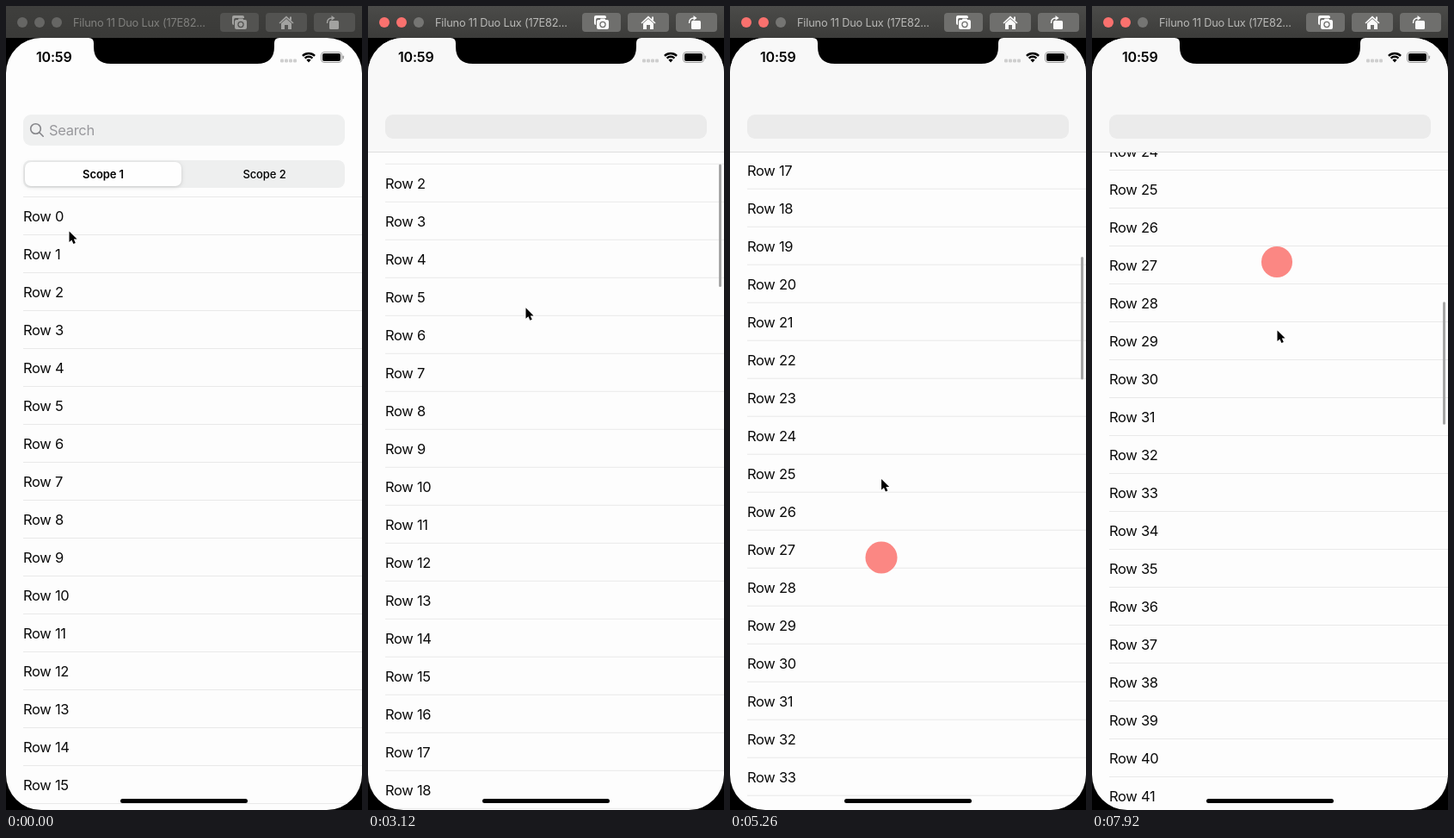
An HTML page with a canvas that plays this animation: 414x933 px, repeating every 8 s.

```html
<!DOCTYPE html>
<html lang="en">
<head>
<meta charset="utf-8">
<title>Search bar collapsing on scroll</title>
<style>
  html, body { margin: 0; width: 414px; height: 933px; overflow: hidden; background: #000; }
  canvas { display: block; }
</style>
</head>
<body>
<canvas id="stage" width="414" height="933"></canvas>
<script>
const ctx = document.getElementById('stage').getContext('2d');
const LOOP = 8000, ROW = 44, LIST_TOP = 221;

const linear = u => u;
const smooth = u => u * u * (3 - 2 * u);
const easeOut = u => 1 - (1 - u) ** 1.6;
const clamp = (v, lo, hi) => Math.min(hi, Math.max(lo, v));

// Keys: [time, values, easing towards this key]
const pointerKeys = [
  [0, [73, 261]], [430, [73, 261]], [1010, [179, 489], smooth], [1600, [179, 489]],
  [2160, [183, 445], smooth], [2240, [184, 425]], [3120, [183, 350]],
  [3610, [182, 285], easeOut], [3810, [182, 285]], [4380, [178, 110], smooth],
  [4620, [178, 110]], [5100, [176, 640], smooth], [5170, [176, 640]],
  [5480, [174, 200], smooth], [5940, [174, 206]], [6000, [174, 210]],
  [6900, [178, 594]], [7010, [179, 680], easeOut], [7560, [208, 55], smooth],
  [7820, [215, 297]], [7920, [215, 376]], [LOOP, [215, 376]]
];
const scrollKeys = [
  [0, [0]], [2239, [0]], [2240, [49]], [3120, [126]], [3610, [195], easeOut],
  [3810, [195]], [4380, [372], smooth], [4540, [385]], [4620, [428]],
  [5150, [620], easeOut], [5450, [1110]], [5960, [1896], easeOut], [6060, [1896]],
  [6900, [1543]], [7000, [1470]], [7820, [1195], easeOut], [7920, [1131]], [LOOP, [1131]]
];
const presses = [[1370, 179, 489], [3840, 182, 285], [5150, 176, 640], [5940, 174, 206], [7820, 215, 297]];

function sample(keys, t) {
  const i = Math.max(1, keys.findIndex(k => k[0] > t));
  const [t0, from] = keys[i - 1], [t1, to, ease = linear] = keys[i];
  const u = ease((t - t0) / (t1 - t0));
  return from.map((v, j) => v + (to[j] - v) * u);
}

function box(x, y, w, h, r, color) {
  ctx.fillStyle = color;
  ctx.beginPath();
  ctx.roundRect(x, y, w, h, r);
  ctx.fill();
}

function disc(x, y, r, color) {
  ctx.fillStyle = color;
  ctx.beginPath();
  ctx.arc(x, y, r, 0, 7);
  ctx.fill();
}

function shape(d, color) {
  ctx.fillStyle = color;
  ctx.fill(new Path2D(d));
}

function stroke(d, color, width) {
  ctx.strokeStyle = color;
  ctx.lineWidth = width;
  ctx.stroke(new Path2D(d));
}

function text(str, x, y, font, color, spacing = 0, align = 'left') {
  ctx.font = font + ' Inter, sans-serif';
  ctx.letterSpacing = spacing + 'px';
  ctx.textAlign = align;
  ctx.fillStyle = color;
  ctx.fillText(str, x, y);
}

function drawToolbar(active) {
  const bar = ctx.createLinearGradient(0, 0, 0, 37);
  bar.addColorStop(0, active ? '#4b4b49' : '#3f3f3d');
  bar.addColorStop(1, active ? '#3c3c3a' : '#3a3a38');
  ctx.fillStyle = bar;
  ctx.fillRect(0, 0, 414, 37);

  const light = active ? '#f9716e' : '#666664';
  disc(19, 19, 6, light);
  disc(39, 19, 6, light);
  disc(59, 19, 6, active ? '#757573' : '#666664');
  text('Filuno 11 Duo Lux (17E82...', 78, 24, '12.8px', active ? '#b9b9b7' : '#80807e', -0.2);

  const button = active ? '#6f6f6d' : '#535351';
  const icon = active ? '#fafafa' : '#a2a2a0';
  for (const [x, w] of [[249, 45], [302, 48], [358, 48]]) box(x, 8, w, 22, 4, button);

  box(263, 11, 14, 11, 2, icon);
  box(265, 14, 16, 14, 2, button);
  box(266, 16, 14, 11, 2, icon);
  box(270, 14.5, 6, 4, 1, icon);
  disc(273, 21.5, 3.7, button);
  disc(273, 21.5, 2.4, icon);

  shape('M317.5 19.5L326 11.5L334.5 19.5L333.5 20.5L326 14L318.5 20.5Z', icon);
  shape('M320 20L326 15L332 20V27H328V22H324V27H320Z', icon);
  ctx.fillStyle = icon;
  ctx.fillRect(330, 12.5, 2, 4);

  box(376, 17, 11, 10, 1.5, icon);
  stroke('M373.5 20Q373.5 14 379 14', icon, 1.4);
  shape('M378.5 11L382.5 14L378.5 17Z', icon);
}

function drawRows(scroll, top) {
  ctx.save();
  ctx.beginPath();
  ctx.rect(0, top, 414, 933 - top);
  ctx.clip();
  const first = Math.max(0, Math.floor((scroll + top - LIST_TOP) / ROW));
  for (let n = first; n < first + 19; n++) {
    const y = LIST_TOP + n * ROW - scroll;
    ctx.fillStyle = '#e9e9e9';
    ctx.fillRect(20, y, 394, 1);
    text('Row ' + n, 20, y + 28.8, '16.5px', '#0b0b0b', -0.3);
  }
  ctx.restore();
}

function drawHeader(scroll, bottom) {
  const height = clamp(bottom - 141, 28, 36);
  const middle = 126 + height / 2;
  if (scroll > 0) {
    ctx.fillStyle = '#f8f8f8';
    ctx.fillRect(0, 37, 414, bottom - 37);
    ctx.fillStyle = '#dedede';
    ctx.fillRect(0, bottom, 414, 1);
  }
  box(20, 126, 374, height, 9, scroll > 0 ? '#ebebeb' : '#eff0f0');

  ctx.globalAlpha = (height - 28) / 8;
  ctx.lineCap = 'round';
  ctx.strokeStyle = '#858589';
  ctx.lineWidth = 1.6;
  ctx.beginPath();
  ctx.arc(34.5, middle - 1.5, 5.8, 0, 7);
  ctx.moveTo(38.8, middle + 2.8);
  ctx.lineTo(43.2, middle + 7.2);
  ctx.stroke();
  text('Search', 50, middle + 5.5, '16.5px', '#98989c', -0.3);

  ctx.globalAlpha = clamp(1 - scroll / 20, 0, 1);
  box(20, 179, 374, 32, 8, '#eeefef');
  ctx.save();
  ctx.shadowColor = 'rgba(0,0,0,.16)';
  ctx.shadowBlur = 4;
  ctx.shadowOffsetY = 1;
  box(22, 181, 182, 28, 7, '#fefefe');
  ctx.restore();
  text('Scope 1', 113, 200, '600 13px', '#000', -0.1, 'center');
  text('Scope 2', 300.5, 200, '500 13px', '#000', -0.1, 'center');
  ctx.globalAlpha = 1;
}

function drawStatus() {
  shape('M96 37Q102 37 102 43V47Q102 67 122 67H292Q312 67 312 47V43Q312 37 318 37Z', '#000');
  text('10:59', 35, 65.3, '600 16px', '#000', -0.2);
  for (let i = 0; i < 4; i++) box(319 + i * 5, 61.5, 4, 4, 1.2, '#cfcfcf');

  ctx.lineCap = 'butt';
  ctx.strokeStyle = '#000';
  ctx.lineWidth = 2.4;
  for (const r of [10, 6.2]) {
    ctx.beginPath();
    ctx.arc(352, 65, r, -Math.PI * 0.75, -Math.PI * 0.25);
    ctx.stroke();
  }
  shape('M352 65.5L349.4 62.6Q352 60.4 354.6 62.6Z', '#000');

  ctx.strokeStyle = '#9b9b9b';
  ctx.lineWidth = 1;
  ctx.beginPath();
  ctx.roundRect(366.5, 53.5, 24, 12, 3.5);
  ctx.stroke();
  box(368, 55, 21, 9, 2, '#000');
  box(391.5, 57.5, 1.5, 4, 1, '#9b9b9b');
}

function drawPresses(t) {
  for (const [start, x, y] of presses) {
    const age = t - start;
    if (age < 0 || age > 350) continue;
    ctx.globalAlpha = clamp((350 - age) / 170, 0, 1);
    disc(x, y, Math.min(22, 13 + age * 0.05), '#fb8783');
    ctx.globalAlpha = 1;
  }
}

function drawPointer(x, y) {
  ctx.save();
  ctx.translate(x, y);
  ctx.lineJoin = 'round';
  const arrow = 'M.5 .5V13L3.4 10.4L5.4 15L7.8 14L5.8 9.6H9.6Z';
  stroke(arrow, '#fff', 2);
  shape(arrow, '#000');
  ctx.restore();
}

function draw(t) {
  const [scroll] = sample(scrollKeys, t);
  const [x, y] = sample(pointerKeys, t);
  const bottom = Math.max(169, LIST_TOP - scroll);

  ctx.fillStyle = '#000';
  ctx.fillRect(0, 0, 414, 933);
  drawToolbar(t >= 90);

  ctx.save();
  box(0, 37, 414, 896, 41, '#fdfdfd');
  ctx.clip();
  drawRows(scroll, bottom);
  drawHeader(scroll, bottom);
  drawStatus();
  if (scroll > 0) box(408, Math.max(bottom + 3, 163.5 + scroll * 0.159), 3, 142.5, 1.5, '#a6a6a6');
  box(133, 920, 148, 5, 2.5, '#000');
  ctx.restore();

  drawPresses(t);
  drawPointer(x, y);
}

function tick() {
  draw(performance.now() % LOOP);
  requestAnimationFrame(tick);
}
tick();
</script>
</body>
</html>
```
